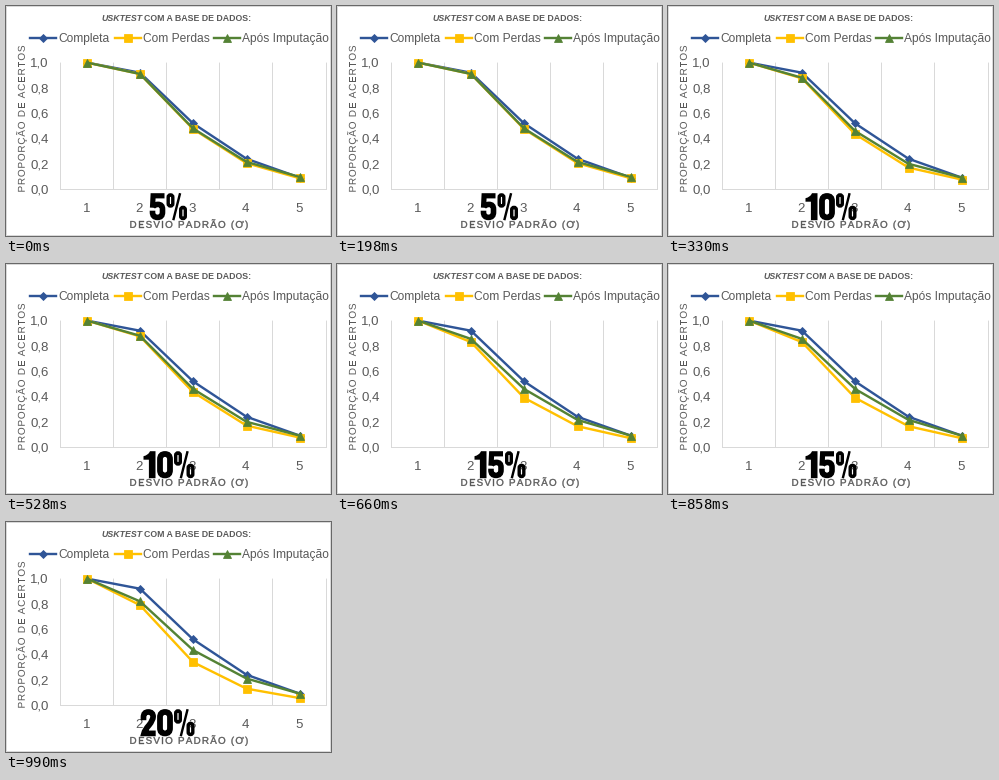
A matplotlib script that plays this animation: 325x230 px, repeating every 1320 ms.

```python
import matplotlib.pyplot as plt
from matplotlib.animation import FuncAnimation
from matplotlib.patches import PathPatch, Rectangle
from matplotlib.path import Path
from matplotlib.textpath import TextPath
from matplotlib.transforms import Affine2D

W, H, DPI = 325, 230, 80
PT = 72 / DPI
FONT = "Liberation Sans"
GREY, PALE = "#595959", "#d9d9d9"

X = [81, 134, 187, 240.5, 294]
Y_ONE, Y_ZERO = 56.6, 183.1

# name, colour, marker, marker size, legend key position
SERIES = [
    ("Completa", "#2f5597", "D", 5.6, 36.5),
    ("Com Perdas", "#ffc000", "s", 7.4, 121.5),
    ("Após Imputação", "#548235", "^", 8.4, 220.5),
]
FULL = [1, .92, .52, .24, .09]
# label, its right edge, values with losses, values after imputation
STEPS = [
    ("5%", 181, [1, .91, .475, .205, .085], [1, .91, .48, .215, .095]),
    ("10%", 188.5, [1, .875, .435, .17, .075], [1, .88, .46, .20, .09]),
    ("15%", 188.5, [1, .83, .39, .165, .07], [1, .855, .46, .215, .09]),
    ("20%", 188.5, [1, .79, .34, .13, .055], [1, .82, .435, .21, .09]),
]

# Heavy condensed figures, 27 px tall: width, then (stroke width, outline)
GLYPHS = {
    "0": (16, [(5.8, "M 3 8 Q 3 2.8 8 2.8 Q 13 2.8 13 8 L 13 19 "
                     "Q 13 24.2 8 24.2 Q 3 24.2 3 19 Z")]),
    "1": (12.5, [(0, "M 6.5 0 L 12 0 L 12 27 L 5.4 27 L 5.4 8.5 "
                     "L 0 8.5 L 0 5 Q 4.8 4 6.5 0 Z")]),
    "2": (15.5, [(5.7, "M 3 11 L 3 8 Q 3 2.8 7.8 2.8 Q 12.6 2.8 12.6 7.5 "
                       "Q 12.6 11 8.5 16 Q 4 21 3.5 24.2 L 15.2 24.2")]),
    "5": (16, [(5.2, "M 15 2.6 L 3.6 2.6 L 3 14.5"),
               (5.6, "M 3.4 13.5 Q 5 11.2 8.5 11.2 Q 13 11.2 13 16 L 13 19 "
                     "Q 13 24.2 8 24.2 Q 3 24.2 3 19 L 3 17.5")]),
    "%": (20.5, [(3.4, "M 1.7 4 Q 1.7 1.7 4 1.7 Q 6.3 1.7 6.3 4 L 6.3 10.5 "
                       "Q 6.3 12.8 4 12.8 Q 1.7 12.8 1.7 10.5 Z"),
                 (3.4, "M 14.2 16.5 Q 14.2 14.2 16.5 14.2 Q 18.8 14.2 18.8 16.5 "
                       "L 18.8 23 Q 18.8 25.3 16.5 25.3 Q 14.2 25.3 14.2 23 Z"),
                 (2.4, "M 13.6 0 L 6.8 27")]),
}

fig = plt.figure(figsize=(W / DPI, H / DPI), dpi=DPI, facecolor="white")
ax = fig.add_axes([0, 0, 1, 1])


def to_path(spec):
    kinds = {"M": (Path.MOVETO, 1), "L": (Path.LINETO, 1),
             "Q": (Path.CURVE3, 2), "Z": (Path.CLOSEPOLY, 0)}
    verts, codes = [], []
    tokens = iter(spec.split())
    for t in tokens:
        code, n = kinds[t]
        for _ in range(n):
            verts.append((float(next(tokens)), float(next(tokens))))
        codes += [code] * n
        if n == 0:
            verts.append(verts[0])
            codes.append(code)
    return Path(verts, codes)


def label(x, y, s, size, **kw):
    ax.text(x, y, s, fontsize=size * PT, family=FONT, color=GREY,
            va="baseline", **kw)


def advance(s, size, prop):
    def ink(t):
        return TextPath((0, 0), t, size=size, prop=prop).get_extents().width
    return ink("H" + s + "H") - ink("HH")


def tracked(x, y, s, size, gap, angle=0, stroke=0):
    prop = {"family": FONT}
    place = Affine2D().scale(1, -1).rotate_deg(angle).translate(x, y) + ax.transData
    pos = 0
    for ch in s:
        if ch != " ":
            glyph = TextPath((pos, 0), ch, size=size, prop=prop)
            ax.add_patch(PathPatch(glyph, fc=GREY, ec=GREY, lw=stroke * PT,
                                   transform=place))
        pos += advance(ch, size, prop) + gap


def rule(xs, ys):
    ax.plot(xs, ys, color=PALE, lw=PT, zorder=1, snap=False,
            solid_capstyle="butt")


def trace(xs, ys, color, marker, size):
    ax.plot(xs, ys, color=color, lw=2.4 * PT, marker=marker, ms=size * PT,
            mew=0.8 * PT, mec=color, solid_joinstyle="round",
            solid_capstyle="round", snap=False)


def big_number(s, right, top=187.2):
    x = right - sum(GLYPHS[c][0] + 1 for c in s) + 1
    for c in s:
        width, parts = GLYPHS[c]
        place = Affine2D().translate(x, top) + ax.transData
        for lw, spec in parts:
            ax.add_patch(PathPatch(to_path(spec), fc="none" if lw else "black",
                                   ec="black", lw=lw * PT, transform=place,
                                   capstyle="butt", joinstyle="miter", zorder=6))
        x += width + 1


def backdrop():
    ax.add_patch(Rectangle((.5, .5), W - 1, H - 1, fc="white", ec=PALE, lw=PT,
                           snap=False))
    for k in range(6):
        gx = int(54 + 53.2 * k) + .5
        rule([gx, gx], [Y_ONE, Y_ZERO])
        y = Y_ONE + (Y_ZERO - Y_ONE) * k / 5
        label(42.5, y + 4.2, f"{1 - k / 5:.1f}".replace(".", ","), 13.3, ha="right")
    rule([54, 321], [183.5, 183.5])
    for k, x in enumerate(X, 1):
        label(x - .7, 205.5, str(k), 13.3, ha="center")

    size = 8.75
    name = "USKTEST"
    label(95, 15, name, size, weight="bold", style="italic")
    step = advance(name, size, {"family": FONT, "weight": "bold"})
    label(97.6 + step, 15, "COM A BASE DE DADOS:", size, weight="bold")
    tracked(18.8, 186.5, "PROPORÇÃO DE ACERTOS", 10, .75, angle=-90)
    tracked(123.5, 221.8, "DESVIO PADRÃO (Ơ)", 9.8, 1.25, stroke=.35)


def legend():
    for name, color, marker, ms, x in SERIES:
        ax.plot([x - 13, x + 13], [32, 32], color=color, lw=2.4 * PT)
        trace([x], [32], color, marker, ms)
        label(x + 15.5, 36, name, 12)


def draw(i):
    ax.clear()
    ax.axis("off")
    ax.set_xlim(0, W)
    ax.set_ylim(H, 0)
    text, right, lost, filled = STEPS[i % len(STEPS)]
    backdrop()
    legend()
    for (_, color, marker, ms, _), vals in zip(SERIES, (FULL, lost, filled)):
        trace(X, [Y_ZERO + (Y_ONE - Y_ZERO) * v for v in vals], color, marker, ms)
    big_number(text, right)
    return []


anim = FuncAnimation(fig, draw, frames=len(STEPS), interval=330,
                     init_func=lambda: [], repeat=True, repeat_delay=0)
plt.show()
```
